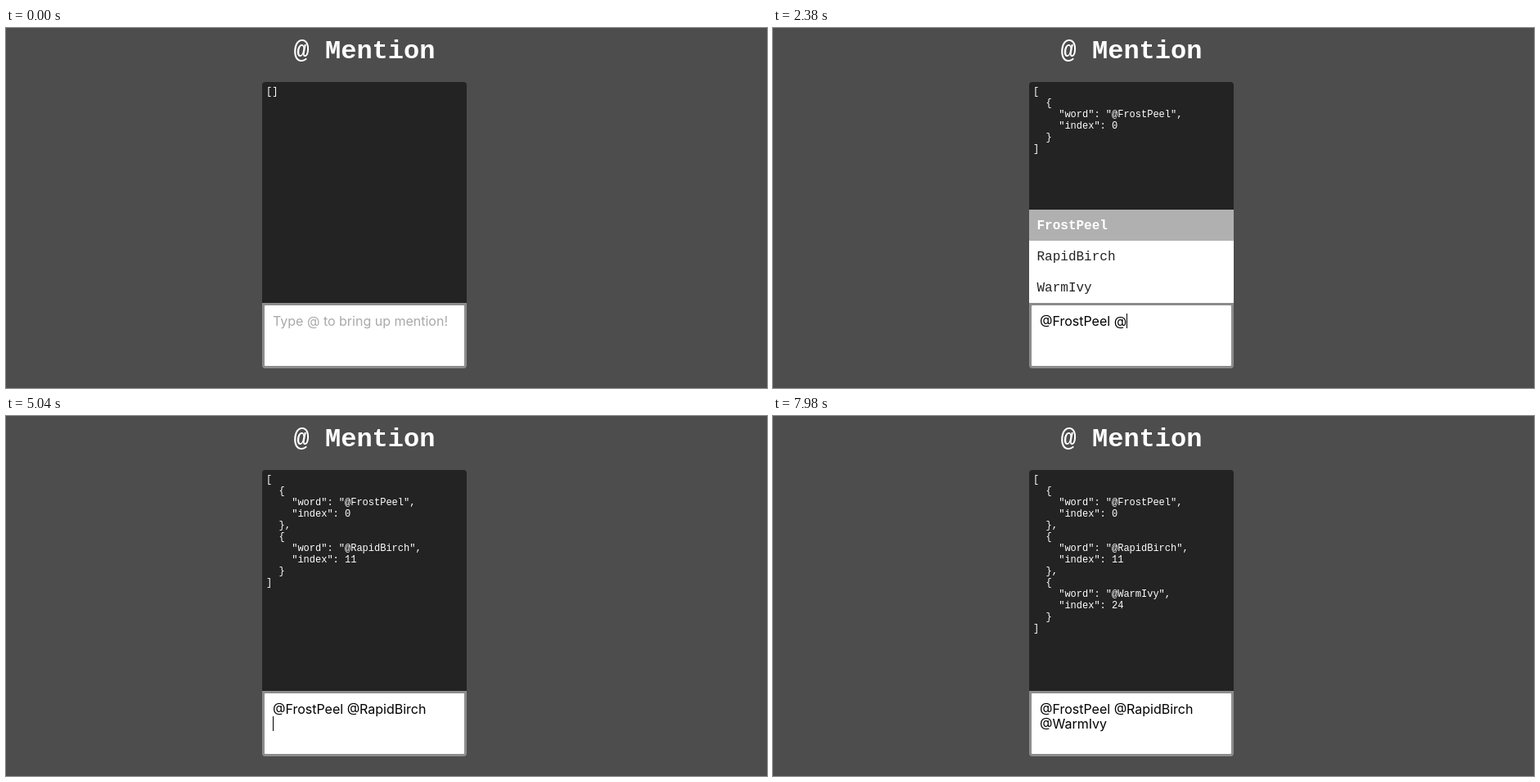
Animation of 930 by 440 pixels, one loop 8000 ms. Source, as an HTML page:

```html
<!DOCTYPE html>
<html lang="en">
<head>
<meta charset="utf-8">
<title>@ Mention</title>
<style>
  html, body { margin: 0; width: 100%; height: 100%; overflow: hidden; background: #4d4d4d; }
  svg { display: block; }
  text { white-space: pre; }
  .mono { font-family: "Liberation Mono", monospace; }
  .sans { font-family: Inter, sans-serif; font-size: 16px; }
</style>
</head>
<body>
<svg id="stage" width="930" height="440" viewBox="0 0 930 440">
  <rect width="930" height="440" fill="#4d4d4d"/>
  <text class="mono" x="351.6" y="37" font-size="32" font-weight="bold" fill="#fff">@ Mention</text>
  <path d="M313 336V70q0-4 4-4H559q4 0 4 4V336z" fill="#232323"/>
  <g id="json" class="mono" font-size="12" fill="#fff"></g>
  <g id="menu" class="mono" font-size="16"></g>
  <path d="M313 336H563V412q0 4-4 4H317q-4 0-4-4z" fill="#8c8c8c"/>
  <rect x="316" y="339" width="244" height="74" rx="1" fill="#fff"/>
  <text id="hint" class="sans" x="326" y="364" fill="#a9a9a9">Type @ to bring up mention!</text>
  <g id="input" class="sans" fill="#000"></g>
  <rect id="caret" width="1" height="18" fill="#000"/>
</svg>
<script>
const LOOP = 8000, BLINK = 530;
const NAMES = ["FrostPeel", "RapidBirch", "WarmIvy"];
const INDEXES = [0, 11, 24];
const [first, second, third] = NAMES.map(n => "@" + n);

// time, number of stored mentions, typed lines, highlighted row (-1: menu closed)
const STEPS = [
  [0, 0, [], -1],
  [280, 0, ["@"], -1],
  [490, 0, ["@"], 0],
  [1890, 1, [first + " "], -1],
  [2310, 1, [first + " @"], 0],
  [2870, 1, [first + " @"], 2],
  [4060, 1, [first + " @"], 1],
  [4690, 2, [`${first} ${second} `], -1],
  [4900, 2, [`${first} ${second} `, ""], -1],
  [5110, 2, [`${first} ${second} `, "@"], 0],
  [5600, 2, [`${first} ${second} `, "@"], 2],
  [7280, 3, [`${first} ${second} `, third + " "], -1]
];
const KEYS = STEPS.map(s => s[0]).filter(t => t !== 490);

const $ = id => document.getElementById(id);

function add(parent, tag, attrs, content = "") {
  const el = document.createElementNS("http://www.w3.org/2000/svg", tag);
  for (const key in attrs) el.setAttribute(key, attrs[key]);
  el.textContent = content;
  parent.append(el);
  return el;
}

function drawJson(count) {
  const lines = [];
  for (let i = 0; i < count; i++) {
    lines.push([1, "{"], [2, `"word": "@${NAMES[i]}",`],
      [2, `"index": ${INDEXES[i]}`], [1, i < count - 1 ? "}," : "}"]);
  }
  const all = count ? [[0, "["], ...lines, [0, "]"]] : [[0, "[]"]];
  all.forEach(([level, line], i) =>
    add($("json"), "text", { x: 318 + level * 15.6, y: 81 + i * 14 }, line));
}

function drawMenu(active) {
  if (active < 0) return;
  NAMES.forEach((name, i) => {
    const on = i === active, y = 222 + i * 38;
    add($("menu"), "rect", { x: 313, y, width: 250, height: 38, fill: on ? "#b0b0b0" : "#fff" });
    add($("menu"), "text", {
      x: 322.5, y: y + 24, fill: on ? "#fff" : "#232323", "font-weight": on ? "bold" : "normal"
    }, name);
  });
}

function drawInput(lines) {
  $("hint").style.display = lines.length ? "none" : "";
  let last;
  lines.forEach((line, i) => {
    last = add($("input"), "text", { x: 326, y: 364 + i * 18 }, line);
  });
  if (!last) return;
  $("caret").setAttribute("x", Math.round(326 + last.getComputedTextLength()));
  $("caret").setAttribute("y", 349 + (lines.length - 1) * 18);
}

let shown = null;

function render(t) {
  const step = STEPS.findLast(s => s[0] <= t);
  if (step !== shown) {
    shown = step;
    for (const id of ["json", "menu", "input"]) $(id).replaceChildren();
    drawJson(step[1]);
    drawInput(step[2]);
    drawMenu(step[3]);
  }
  const idle = t - KEYS.findLast(k => k <= t);
  const lit = step[2].length && Math.floor(idle / BLINK) % 2 === 0;
  $("caret").style.display = lit ? "" : "none";
}

const start = performance.now();
function tick() {
  render((performance.now() - start) % LOOP);
  requestAnimationFrame(tick);
}
tick();
</script>
</body>
</html>
```
